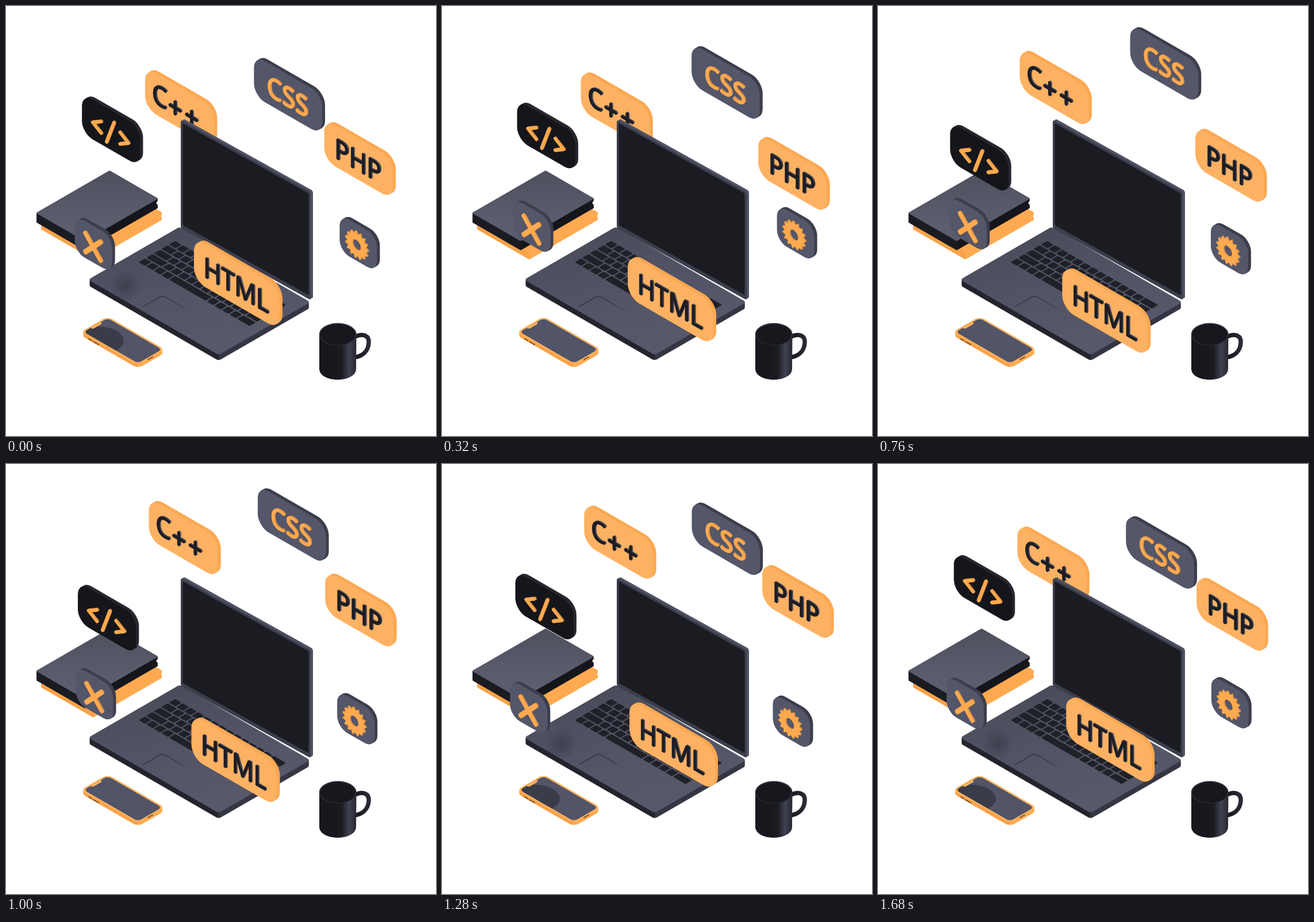
Recreate the animation shown at these times as an HTML page with a canvas. Size 748 by 748 pixels, loop 1.72 s.

```html
<!DOCTYPE html>
<html lang="en">
<head>
<meta charset="utf-8">
<title>Developer desk</title>
<style>
html, body { margin: 0; width: 100%; height: 100%; overflow: hidden; background: #fff; }
canvas { display: block; width: 748px; height: 748px; }
</style>
</head>
<body>
<canvas id="stage" width="748" height="748"></canvas>
<script>
const ctx = document.getElementById('stage').getContext('2d');
const LOOP = 1720, STEP = 40, TAU = Math.PI * 2;
const COS = 0.866, SLOPE = 0.577;
const ORANGE = '#ffaa50', GRAY = '#545669', DARK = '#1b1c22';

function line(...pts) {
  ctx.beginPath();
  pts.forEach(([x, y], i) => i ? ctx.lineTo(x, y) : ctx.moveTo(x, y));
  ctx.stroke();
}

function ellipse(x, y, rx, ry, fill) {
  ctx.beginPath();
  ctx.ellipse(x, y, rx, ry, 0, 0, TAU);
  ctx.fillStyle = fill;
  ctx.fill();
}

function roundRect(x, y, w, h, r, fill) {
  ctx.beginPath();
  ctx.roundRect(x, y, w, h, r);
  ctx.fillStyle = fill;
  ctx.fill();
}

function gradient(x0, y0, x1, y1, ...colors) {
  const g = ctx.createLinearGradient(x0, y0, x1, y1);
  colors.forEach((c, i) => g.addColorStop(i / (colors.length - 1), c));
  return g;
}

function within(matrix, draw) {
  ctx.save();
  ctx.transform(...matrix);
  draw();
  ctx.restore();
}

// Isometric planes: upright panels and flat surfaces
const upright = (x, y, slope = 0.5) => [COS, slope, 0, 1, x, y];
const flat = (x, y) => [COS, 0.5, COS, -0.5, x, y];

// Flat box; x, y is its left top corner, u runs to the front and v to the back
function slab(x, y, u, v, depth, r, top, left, right) {
  for (let i = depth; i >= 0; i--) {
    within(flat(x, y + i), () => {
      const m = u / 2;
      roundRect(0, 0, u, v, r, i ? gradient(m - 1, m - 1, m + 1, m + 1, left, right) : gradient(0, v, u, v * 0.4, ...top));
    });
  }
}

// Upright panel with its thickness going back to the right
function panel(x, y, w, h, r, thick, face, edge, slope) {
  for (let i = thick; i >= 0; i--) {
    within(upright(x + i, y - i * SLOPE, slope), () => roundRect(0, 0, w, h, r, i ? edge : face));
  }
}

function word(text, x = 0, y = 0) {
  const size = 48;
  ctx.font = `${size}px "Noto Sans", sans-serif`;
  ctx.textAlign = 'center';
  ctx.lineWidth = 0.8;
  ctx.fillText(text, x, y + size * 0.357);
  ctx.strokeText(text, x, y + size * 0.357);
}

const label = text => () => word(text);

function cppMark() {
  word('C', -39, -3);
  ctx.lineWidth = 5;
  for (const x of [-8, 25]) {
    line([x - 10, 2], [x + 10, 2]);
    line([x, -8], [x, 12]);
  }
}

function tagMark() {
  ctx.lineWidth = 5;
  for (const side of [-1, 1]) line([side * 19, -8], [side * 36, 2], [side * 19, 12]);
  line([7, -19], [-8, 22]);
}

function crossMark() {
  ctx.lineWidth = 7.5;
  for (const side of [-1, 1]) line([side * 15, -14], [-side * 15, 18]);
}

function gearMark() {
  const teeth = 15;
  ctx.beginPath();
  for (let i = 0; i < teeth * 2; i++) {
    const r = i % 2 ? 18 : 24, a = i * Math.PI / teeth;
    ctx.lineTo(-2 + r * Math.cos(a), 1 + r * Math.sin(a));
  }
  ctx.closePath();
  ctx.moveTo(7, 1);
  ctx.arc(-2, 1, 9, 0, TAU);
  ctx.fill('evenodd');
}

const orange = { face: '#fdb162', edge: '#fca851', ink: '#1d1e25', bevel: '#4d4e5c' };
const gray = { face: GRAY, edge: '#3d3e4c', ink: ORANGE, bevel: '#dc8f42' };
const black = { ...gray, face: '#15161b', edge: '#26272f' };

// x, y: mean left and top; low: time of the lowest point; w: width
const cpp = { x: 244.8, y: 91, low: 195, w: 139, skin: orange, mark: cppMark };
const cross = { x: 121.5, y: 355, low: 1430, w: 75, skin: gray, mark: crossMark };
const frontCards = [
  { x: 128.5, y: 184, low: 920, w: 117, skin: black, mark: tagMark },
  cross,
  { x: 435, y: 63.5, low: 1675, w: 137, skin: gray, mark: label('CSS') },
  { x: 553.5, y: 203, low: 440, w: 138, skin: orange, mark: label('PHP') },
  { x: 579, y: 377, low: 1185, w: 75, skin: gray, mark: gearMark },
  { x: 324, y: 430, low: 685, w: 172, skin: orange, mark: label('HTML') }
];

const drift = (card, t) => 27.3 * Math.cos(TAU * (t - card.low) / LOOP);

function drawCard(card, t) {
  const { w, skin, mark } = card, dy = drift(card, t);
  const h = 55 + w * 0.12, r = h * 0.31;
  const x = card.x - dy * 0.135, y = card.y + dy + 3 - 0.382 * r;
  panel(x, y, w, h, r, 5, skin.face, skin.edge);
  for (let out = -1; out <= 2; out++) {
    within(upright(x - out * COS, y + out * 0.5), () => {
      ctx.translate(w / 2, h / 2 + 2);
      ctx.fillStyle = ctx.strokeStyle = out < 1 ? skin.bevel : skin.ink;
      mark();
    });
  }
}

function bite(x, y, size) {
  ctx.beginPath();
  ctx.moveTo(x + 1, y);
  ctx.lineTo(x - size * 0.3, y + size / 2);
  ctx.lineTo(x + 1, y + size);
  ctx.fillStyle = '#fff';
  ctx.fill();
}

function drawBooks() {
  slab(60, 376, 106, 139, 12, 2, [ORANGE, ORANGE], '#f9a248', ORANGE);
  bite(272, 361, 9);
  slab(52, 360, 98, 148, 16, 2, ['#4f505e', '#5c5d6e'], DARK, '#15161b');
  bite(265, 336, 13);
}

function drawKeys() {
  const pitch = 15.2, left = 19, right = 244;
  for (let row = 0; row < 5; row++) {
    let u = left, key = 0;
    while (u < right - 4) {
      const space = row === 0 && key === 4;
      let width = space ? pitch * 5 : key ? pitch : pitch + 6 * ((4 - row) % 4);
      if (right - u - width < pitch) width = right - u;
      roundRect(u, 80 + row * pitch, width - 2.3, pitch - 2.5, 2, '#202128');
      u += width;
      key++;
    }
  }
}

function drawLaptop(shade) {
  slab(143, 476, 262, 184, 10, 5, ['#4a4b5a', '#525466', '#57596a'], '#23242c', '#353643');
  within(flat(145, 476), () => {
    drawKeys();
    ctx.strokeStyle = gradient(100, 0, 168, 0, '#25262e', '#30313c', '#50526500');
    ctx.lineWidth = 1.4;
    line([101, 7], [101, 43], [104, 46], [168, 46]);
  });
  if (shade > 0) {
    const soft = ctx.createRadialGradient(208, 487, 2, 208, 487, 28);
    soft.addColorStop(0, `rgba(25,26,34,${0.3 * shade})`);
    soft.addColorStop(1, 'rgba(25,26,34,0)');
    ellipse(208, 487, 28, 28, soft);
  }
  panel(304, 198, 261, 188, 4, 4, '#3d3e4c', '#505264', 0.482);
  within(upright(304, 198, 0.482), () => roundRect(4, 4, 253, 177, 2, DARK));
}

function drawPhone(shade) {
  slab(130, 567, 115, 54, 6, 9, ['#ffb35f', '#ffb35f'], '#f9a248', '#fdab52');
  ctx.strokeStyle = '#7a4c22';
  ctx.lineWidth = 2;
  line([144, 579], [149, 582]);
  line([152, 584], [161, 589]);
  line([247, 615], [255, 610.5]);
  within(flat(130, 567), () => {
    roundRect(3, 3, 109, 48, 6.5, '#525467');
    ctx.clip();
    ctx.globalAlpha = shade;
    ellipse(34, 6, 34, 32, '#3b3c4a');
    ctx.globalAlpha = 1;
    roundRect(-4, 17, 11, 20, 3.5, '#ffb35f');
  });
}

function drawMug() {
  ctx.lineWidth = 7.5;
  ctx.strokeStyle = gradient(606, 0, 635, 0, '#17181d', '#2b2c36');
  ctx.beginPath();
  ctx.moveTo(606, 576);
  ctx.bezierCurveTo(622, 568, 632, 574, 631, 586);
  ctx.bezierCurveTo(630, 601, 620, 609, 607, 611);
  ctx.stroke();
  ctx.beginPath();
  ctx.moveTo(545, 571);
  ctx.lineTo(545, 632);
  ctx.bezierCurveTo(547, 656, 607, 656, 609, 632);
  ctx.lineTo(609.5, 571);
  ctx.fillStyle = gradient(545, 0, 610, 0, '#17181d', '#17181d', '#17181d', '#1b1c22', '#414251', '#25262e');
  ctx.fill();
  ellipse(577.2, 571, 32.5, 19.5, '#32333e');
  ellipse(577.2, 571.5, 30.8, 18.2, '#17181d');
}

function render(now) {
  const t = Math.floor(now % LOOP / STEP) * STEP;
  // The small card darkens the laptop and phone while it hangs low
  const shade = Math.max(0, Math.min(1, (cross.y + drift(cross, t) - 358) / 10));
  ctx.fillStyle = '#fff';
  ctx.fillRect(0, 0, 748, 748);
  ctx.lineCap = ctx.lineJoin = 'round';
  drawCard(cpp, t);
  drawBooks();
  drawLaptop(shade);
  drawPhone(shade);
  drawMug();
  frontCards.forEach(card => drawCard(card, t));
}

const start = performance.now();
function tick() {
  render(performance.now() - start);
  requestAnimationFrame(tick);
}
tick();
</script>
</body>
</html>
```
